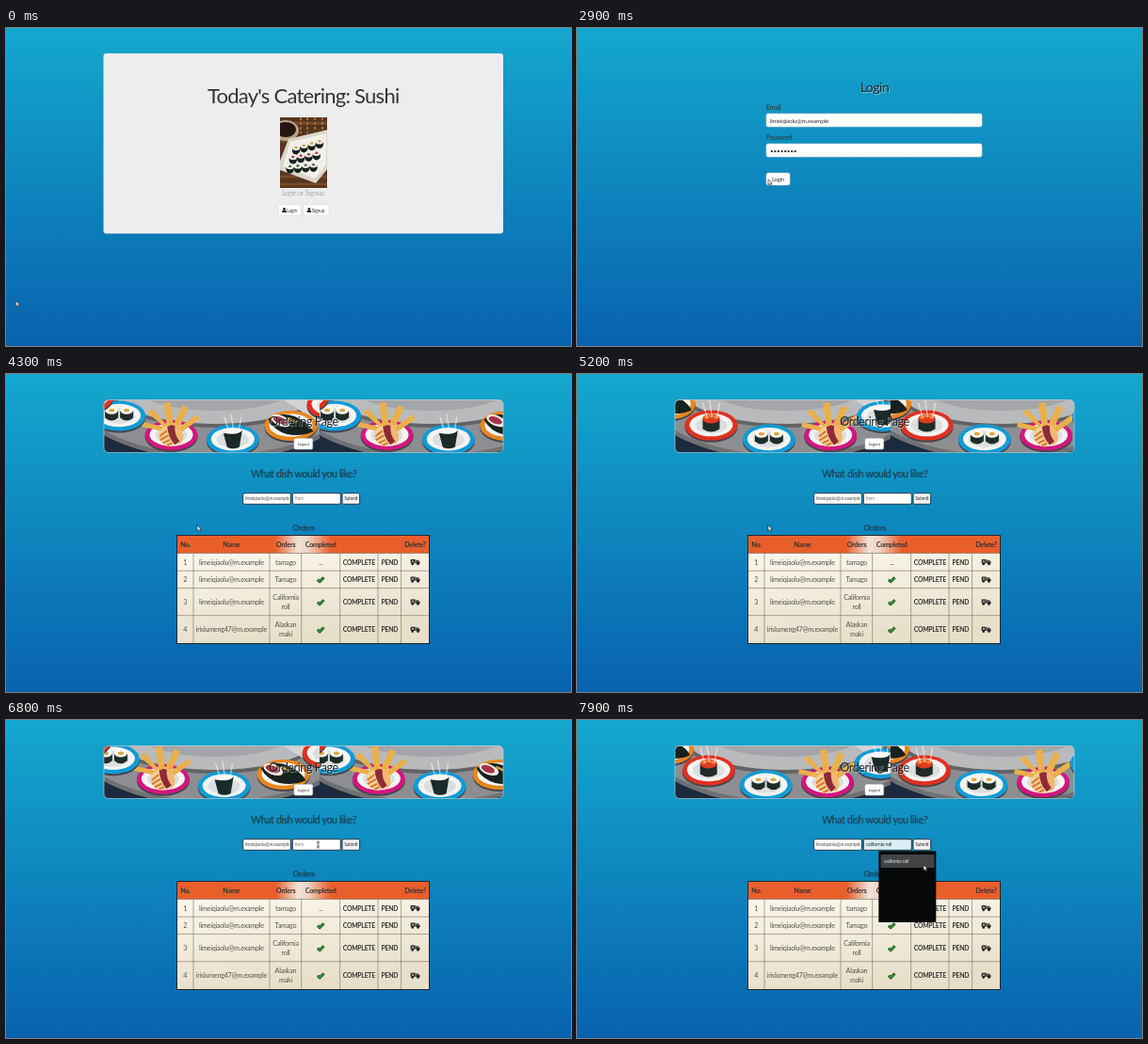
These frames come from a looping animation (600x338 px, 8 s). An HTML page:

```html
<!DOCTYPE html>
<html lang="en">
<head>
<meta charset="utf-8">
<title>Sushi catering</title>
<style>
  html, body { margin: 0; width: 100%; height: 100%; overflow: hidden; background: #0d86bd; }
  svg { display: block; width: 100vw; height: 100vh; }
  text { font-family: Lato, "Open Sans", sans-serif; letter-spacing: -.034em; fill: #333; }
  .mid text, text.mid { text-anchor: middle; }
  .bold { font-weight: 700; }
  .glow { fill: #1a2228; text-shadow: .7px .7px 1px #ffffff80; }
  .soft { fill: #1d4254; text-shadow: .5px .5px .8px #08283a70; }
  .cell { fill: #57534d; }
  .btn { fill: #fff; stroke: #d6d6d6; stroke-width: .6; }
  .field { fill: #fff; stroke: #263b46; stroke-width: 1; }
  .field + g text { fill: #555; }
  .grid { fill: none; stroke: #77705f; stroke-width: .6; }

  .home, .login, .order, .status, .menu, .fill, .arrow, .hand, .beam {
    visibility: hidden;
    animation: 8s step-end infinite;
  }
  .home { animation-name: home; }
  .login { animation-name: login; }
  .order { animation-name: order; }
  .status { animation-name: status; }
  .menu { animation-name: menu; }
  .fill { animation-name: fill; }
  .arrow { animation-name: arrow; }
  .hand { animation-name: hand; }
  .beam { animation-name: beam; }
  @keyframes home { 0% { visibility: visible } 28.75% { visibility: hidden } }
  @keyframes login { 28.75% { visibility: visible } 43.75% { visibility: hidden } }
  @keyframes order { 43.75%, 100% { visibility: visible } }
  @keyframes status { 22.5% { visibility: visible } 28.75% { visibility: hidden } }
  @keyframes menu { 90%, 100% { visibility: visible } }
  @keyframes fill { 95%, 100% { visibility: visible } }
  @keyframes arrow {
    0% { visibility: visible } 22.5% { visibility: hidden }
    28.75% { visibility: visible } 83% { visibility: hidden }
    91.5%, 100% { visibility: visible }
  }
  @keyframes hand { 22.5% { visibility: visible } 28.75% { visibility: hidden } }
  @keyframes beam { 83% { visibility: visible } 91.5% { visibility: hidden } }

  .cursor { animation: move 8s ease-in-out infinite; }
  @keyframes move {
    0%, 12.5% { transform: translate(10.5px, 290px) }
    22.5%, 27.5% { transform: translate(294.5px, 194px) }
    30%, 77.5% { transform: translate(203px, 160.8px) }
    84%, 91% { transform: translate(331.5px, 132.5px) }
    96%, 100% { transform: translate(368px, 154px) }
  }
</style>
</head>
<body>
<svg viewBox="0 0 600 338" preserveAspectRatio="none">
  <defs>
    <linearGradient id="sky" x2="0" y2="1">
      <stop stop-color="#14a8cd"/><stop offset="1" stop-color="#0862ae"/>
    </linearGradient>
    <linearGradient id="cream" x2=".25" y2="1">
      <stop stop-color="#fffcf3"/><stop offset="1" stop-color="#e8dfca"/>
    </linearGradient>
    <linearGradient id="shine">
      <stop offset=".39" stop-color="#e95f2c"/><stop offset=".48" stop-color="#efe2d8"/>
      <stop offset=".52" stop-color="#eed3c3"/><stop offset=".61" stop-color="#e95f2c"/>
    </linearGradient>
    <clipPath id="banner"><rect x="104" y="27.5" width="424" height="56" rx="5"/></clipPath>
    <clipPath id="tileBox"><rect width="229" height="57"/></clipPath>
    <clipPath id="photoBox"><rect width="50" height="75"/></clipPath>
    <clipPath id="mailBox"><rect x="253" y="127" width="47.5" height="11"/></clipPath>

    <g id="user" fill="#222">
      <circle cx="2.3" cy="1.4" r="1.4"/><path d="M0 5.2V4.4Q0 2.8 1.5 2.7H3.1Q4.6 2.8 4.6 4.4V5.2Z"/>
    </g>
    <path id="tick" d="M-3.3 .1L-1.1 2.2L3.3-2.2" fill="none" stroke-linejoin="round"/>
    <g id="truck" fill="#1d1d1d">
      <path d="M-5-3H0V1.3H-5ZM.7-2.3H3L4.8-.3V1.6H.7Z"/>
      <circle cx="-3" cy="1.9" r="1.3"/><circle cx="2.8" cy="1.9" r="1.3"/>
      <path d="M-4-2L-1.2.4M-1.2-2L-4 .4M2-1.4L3.5-.2" stroke="#f5efe1" stroke-width=".7"/>
    </g>
    <g id="roll">
      <ellipse cy="3" rx="4.2" ry="4.7" fill="#17201b"/><ellipse rx="4" ry="3.2" fill="#eef0e9"/>
    </g>
  </defs>

  <rect width="600" height="338" fill="url(#sky)"/>

  <g class="home">
    <rect x="103.5" y="27" width="424.5" height="191.5" rx="3" fill="#eeedee"/>
    <text class="mid" x="315.7" y="80" font-size="22">Today's Catering: Sushi</text>
    <g id="photo" transform="translate(291 95)" clip-path="url(#photoBox)">
      <rect width="50" height="75" fill="#55351f"/>
      <path d="M0 6H50M0 25H50M0 63H50M0 71H50" stroke="#784a27" stroke-width="3"/>
      <path d="M22 0V17M29 0V17M37 0V15M45 0V20" stroke="#a16a36" stroke-width="2" stroke-dasharray="3 2"/>
      <ellipse cx="6" cy="14" rx="14" ry="11" fill="#b8a184"/>
      <ellipse cx="6" cy="13" rx="11" ry="8" fill="#241510"/>
      <path d="M9 23L51 13V54L38 70L0 56V46Z" fill="#d9d6cb"/>
      <path d="M11 26L49 17V50L37 65L3 52Z" fill="#f2f0e9"/>
    </g>
    <text class="mid" x="316" y="178" font-size="7.2" font-weight="300" style="fill:#777">Login or Signup:</text>
    <rect class="btn" x="289" y="187.8" width="24.4" height="11.8" rx="1.5"/>
    <rect class="btn" x="315.6" y="187.8" width="27.4" height="11.8" rx="1.5"/>
    <use href="#user" x="293.2" y="190.9"/><text x="298.3" y="195.6" font-size="4.9">Login</text>
    <use href="#user" x="319.6" y="190.9"/><text x="324.7" y="195.6" font-size="4.9">Signup</text>
  </g>

  <g class="login">
    <text class="mid glow" x="316" y="68" font-size="14">Login</text>
    <text x="201" y="87" font-size="7">Email</text>
    <rect class="btn" x="201" y="91" width="229" height="14" rx="2"/>
    <text x="205" y="100.5" font-size="6.5">limeiqiaolu@m.example</text>
    <text x="201" y="119" font-size="7">Password</text>
    <rect class="btn" x="201" y="123" width="229" height="14" rx="2"/>
    <text x="205" y="132.5" font-size="6.5">••••••••</text>
    <rect class="btn" x="201" y="154" width="25" height="13" rx="2"/>
    <text class="mid" x="213.5" y="162.7" font-size="6">Login</text>
  </g>

  <g class="order">
    <g clip-path="url(#banner)">
      <g transform="translate(104 27)">
        <g id="tile" clip-path="url(#tileBox)">
          <rect width="229" height="57" fill="#1c2a3d"/>
          <ellipse cx="118" cy="-4" rx="150" ry="68" fill="#6f7073"/>
          <ellipse cx="118" cy="-5" rx="146" ry="64" fill="#8d8e91"/>
          <ellipse cx="118" cy="-8" rx="112" ry="38" fill="#626366"/>
          <ellipse cx="118" cy="-9" rx="108" ry="35" fill="#b9babc"/>
          <ellipse cx="118" cy="-12" rx="82" ry="24" fill="#a4a5a8"/>
          <path d="M190 0L229 25V8L216 0Z" fill="#d2d3d4"/>
          <g id="plates"></g>
        </g>
        <use href="#tile" x="229"/>
      </g>
    </g>
    <rect x="104" y="27.5" width="424" height="56" rx="5" fill="none" stroke="#c9e5ef" stroke-opacity=".7" stroke-width=".8"/>
    <g class="mid">
      <text class="glow" x="316" y="55" font-size="12.6">Ordering Page</text>
      <rect class="btn" x="306" y="68.5" width="19.6" height="11.5" rx="1.5"/>
      <text x="315.8" y="75.8" font-size="4.3">Logout</text>
      <text class="soft" x="316" y="109.6" font-size="10.6">What dish would you like?</text>
      <text class="soft" x="316" y="166.3" font-size="8.4">Orders</text>
    </g>
    <rect class="field" x="251.7" y="126.7" width="50.6" height="11.6" rx="1.5"/>
    <g clip-path="url(#mailBox)"><text x="253.5" y="134.4" font-size="5">limeiqiaolu@m.example</text></g>
    <rect class="field" x="304.3" y="126.7" width="51" height="11.6" rx="1.5"/>
    <text x="307" y="134.3" font-size="5" style="fill:#888">item</text>
    <rect class="field" x="357" y="126.7" width="18.6" height="11.6" rx="1.5" style="fill:#f1f1f1"/>
    <text class="mid" x="366.3" y="134.4" font-size="5">Submit</text>

    <rect x="181.5" y="171.5" width="268" height="115" fill="url(#cream)"/>
    <rect x="181.5" y="171.5" width="268" height="19" fill="url(#shine)"/>
    <g id="table" class="mid" font-size="7.2"></g>
    <path class="grid" d="M181.5 190.5H449.5M181.5 209.2H449.5M181.5 227.6H449.5M181.5 256.7H449.5M199 190.5V286.5M280 190.5V286.5M313.7 190.5V286.5M354.6 190.5V286.5M395 190.5V286.5M419.6 190.5V286.5"/>
    <rect x="181.5" y="171.5" width="268" height="115" fill="none" stroke="#24282b"/>
  </g>

  <g class="fill">
    <rect class="field" x="304.3" y="126.7" width="51" height="11.6" rx="1.5" style="fill:#d9eff5"/>
    <text x="306.5" y="134.4" font-size="5.4">california roll</text>
  </g>
  <g class="menu">
    <rect x="320.3" y="139.3" width="61" height="75.7" fill="#070909"/>
    <rect x="322.5" y="143" width="57" height="14" fill="#424446"/>
    <text x="326" y="152.3" font-size="5.1" style="fill:#e6e6e6">california roll</text>
  </g>
  <g class="status">
    <rect y="330" width="12.3" height="8" fill="#20282e"/>
    <text x="-1" y="335.8" font-size="4.6" style="fill:#eee">login</text>
  </g>

  <g class="cursor" stroke="#111" stroke-width=".6">
    <path class="arrow" d="M0 0V5.9L1.4 4.7L2.4 6.8L3.5 6.3L2.5 4.3H4.3Z" fill="#fff"/>
    <path class="hand" d="M0 .3Q.8-.5 1.4.3V3L4 3.6V5.6L3.3 7.2H.5L-1.2 4.5L-.6 3.8L0 4.2Z" fill="#fff"/>
    <path class="beam" d="M-1.3-3H1.3M0-3V3M-1.3 3H1.3" fill="none" stroke-width=".9"/>
  </g>
</svg>
<script>
  const $ = id => document.getElementById(id);
  const label = (x, y, s, cls = 'cell') => `<text x="${x}" y="${y}" class="${cls}">${s}</text>`;
  const dot = (x, y, rx, ry, fill) => `<ellipse cx="${x}" cy="${y}" rx="${rx}" ry="${ry}" fill="${fill}"/>`;

  // Sushi in the photograph
  const fillings = ['#e79b3c', '#b23b4c', '#49704a'];
  let rolls = '';
  for (let row = 0; row < 3; row++)
    for (let col = 0; col < 4; col++) {
      const x = 17 + col * 8.3 - row * 3.2, y = 32 + row * 10 - col * 2.2 + row * col * .8;
      rolls += `<use href="#roll" x="${x}" y="${y}"/>` + dot(x, y, 1.7, 1.3, fillings[row]);
    }
  $('photo').innerHTML += rolls;

  // Orders table
  const mail = 'limeiqiaolu@m.example';
  const rows = [
    [200, mail, ['tamago']],
    [218.5, mail, ['Tamago']],
    [242.5, mail, ['California', 'roll']],
    [271.7, 'irislumeng47@m.example', ['Alaskan', 'maki']]
  ];
  const heads = [['No.', 190.5], ['Name', 239.3], ['Orders', 297], ['Completed', 334.2], ['Delete?', 434.5]];
  const tick = y => `<use href="#tick" x="334.2" y="${y}" stroke="#173a17" stroke-width="2.9"/>
    <use href="#tick" x="334.2" y="${y}" stroke="#2fa336" stroke-width="1.5"/>`;
  $('table').innerHTML = heads.map(([s, x]) => label(x, 183.7, s, 'bold')).join('') +
    rows.map(([y, who, dish], i) => {
      const base = y + 2.6;
      return label(190.3, base, i + 1) + label(239.4, base, who) +
        dish.map((s, n) => label(297, base + (n - (dish.length - 1) / 2) * 10, s)).join('') +
        (i ? tick(y) : label(334.2, base, '...')) +
        `<g font-size="6.8">${label(374.8, base, 'COMPLETE', 'bold')}${label(407.3, base, 'PEND', 'bold')}</g>` +
        `<use href="#truck" x="434.7" y="${y}"/>`;
    }).join('');

  // Plates on the belt, in order from left to right
  const plate = (ring, food) => `<g>${dot(0, 2, 28, 16, '#45464d')}${dot(0, 0, 28, 16, ring)}` +
    `${dot(0, -.5, 23, 12.2, '#f4f4f2')}${dot(0, 0, 17, 8.5, '#dddedf')}${food}</g>`;
  const maki = x => `<path d="M${x - 7}-6V2Q${x} 8 ${x + 7} 2V-6Z" fill="#1d2d29"/>` +
    dot(x, -6, 7, 4.2, '#fbfaf4') + dot(x, -6, 3, 1.8, '#e3a43c');
  const steam = '<path d="M-4-8L-9-24M1-9L-2-27M6-8L9-24" stroke="#fff" stroke-opacity=".55" stroke-width="1.3"/>';
  const blue = '#109bd7', pink = '#d3167f', orange = '#e9861f', red = '#e1301f';
  const shrimp = `<path d="M-9-4L-31-9L-30-14L-8-9L-25-24L-20-28L-5-11L-8-34L-1-35L2-11L12-32L18-29L9-9L27-22L30-17L12-4Z" fill="#eab04a"/>
    <g transform="rotate(-20)">
      ${dot(-3, 0, 10, 11, '#f3cf98')}
      <path d="M-12-3L-3-6M-13 1L-3-1M-11 5L-3 4M-8 9L-2 8" stroke="#d9772f" stroke-width="2"/>
      ${dot(5, 1, 7, 11, '#f0b873')}
      <path d="M-1-10Q5-11 7-8Q3 0 6 9L0 11Q-4 1-1-10Z" fill="#8f2b37"/>
    </g>`;
  const cup = `<path d="M-10-7L10-10L7 8Q0 11-6 8Z" fill="#1a2a28"/>
    <path d="M-10-7Q-3-13 10-10Q6-4-10-7Z" fill="#fbfaf5"/>`;
  const long = `<path d="M-24-7Q-10-15 4-10Q18-4 24 6Q12 12-4 9Q-18 5-24-7Z" fill="#17211f"/>
    <g transform="rotate(22)">
      ${dot(-12, -1, 11, 5.5, '#f5efe3')}${dot(-13, -1, 7.5, 3.6, '#a8324a')}
    </g>
    <path d="M-3-8L6-4" stroke="#d9a53f" stroke-width="2.5"/>`;
  const roe = `<path d="M-9-7V4Q0 10 9 4V-7Z" fill="#1e2b29"/>${dot(0, -7, 9, 5, '#dc3c20')}` +
    [-5, 0, 5].map(x => dot(x, -9 - (x ? 0 : 1.5), 2.6, 2.3, '#f27a35')).join('');
  const dishes = plate(pink, shrimp) + plate(blue, cup + steam) + plate(orange, long) +
    plate(red, roe + steam) + plate(blue, maki(-8) + maki(8));
  $('plates').innerHTML = dishes + dishes;

  // Belt progress in plate spacings at given milliseconds
  const beltKeys = [[3500, -2.03], [3600, -1.87], [4300, -.73], [5200, .71], [6800, 4.13], [7900, 5.66], [8000, 5.8]];
  function beltAt(t) {
    const i = Math.max(1, beltKeys.findIndex(k => k[0] >= t));
    const [t0, p0] = beltKeys[i - 1], [t1, p1] = beltKeys[i];
    return p0 + (p1 - p0) * (t - t0) / (t1 - t0);
  }

  // The second set follows one lap apart, so plates enter and leave at the same time
  const plates = [...$('plates').children];
  function placePlate(el, i, belt) {
    const lap = (belt + i + 7.5) % 5 - 2.5;
    const u = i < 5 ? lap : lap - 5 * Math.sign(lap);
    const dx = 144 * Math.sin(.46 * Math.max(-3.4, Math.min(3.4, u)));
    el.setAttribute('transform', `translate(${119 + dx} ${43.5 - .00245 * dx * dx})`);
  }

  let start;
  function draw(now) {
    start ??= now;
    const t = Math.floor((now - start) % 8000 / 100) * 100;
    const belt = beltAt(Math.max(t, 3500));
    plates.forEach((el, i) => placePlate(el, i, belt));
    requestAnimationFrame(draw);
  }
  requestAnimationFrame(draw);
</script>
</body>
</html>
```
